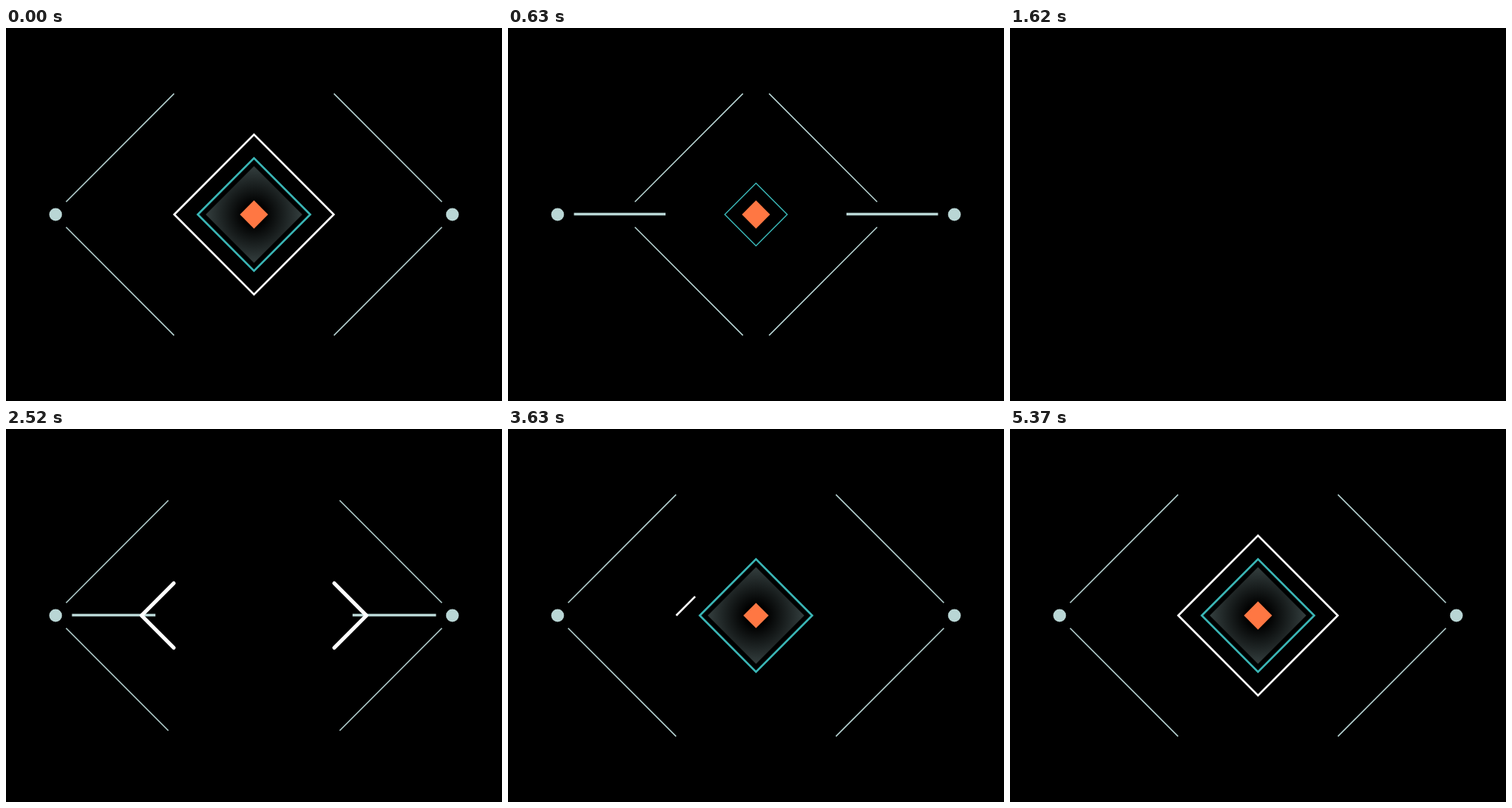
Write an HTML page with a canvas that moves like this. It is 658x494 px and loops after 5400 ms.

```html
<!DOCTYPE html>
<html lang="en">
<head>
<meta charset="utf-8">
<title>Diamond loop</title>
<style>
  html, body { margin: 0; width: 100%; height: 100%; overflow: hidden; background: #000; }
  canvas { display: block; }
</style>
</head>
<body>
<canvas id="stage" width="658" height="494"></canvas>
<script>
const ctx = document.getElementById('stage').getContext('2d');
const LOOP = 5400, CUT = 1620;
const PALE = '#b9d6d5', TEAL = '#3ab6b6', ORANGE = '#ff7743', WHITE = '#fff';
const OUTER = 105.8, INNER = 74.6, FILL = 64, CORE = 18.7;

const ease = {
  in: p => p * p,
  out: p => 1 - (1 - p) ** 2,
  cubicOut: p => 1 - (1 - p) ** 3,
  cubic: p => p < .5 ? 4 * p ** 3 : 1 - 4 * (1 - p) ** 3,
  sine: p => (1 - Math.cos(Math.PI * p)) / 2
};
// Eased progress of t between two times, clamped to 0..1.
const span = (t, from, to, curve = ease.sine) =>
  curve(Math.min(1, Math.max(0, (t - from) / (to - from))));
const mix = (a, b, p) => a + (b - a) * p;

const glow = ctx.createRadialGradient(0, 0, 14, 0, 0, FILL);
glow.addColorStop(0, '#000');
glow.addColorStop(1, '#343f3f');

function polyline(points, color, width, cap = 'butt') {
  ctx.beginPath();
  points.forEach(([x, y]) => ctx.lineTo(x, y));
  ctx.strokeStyle = color;
  ctx.lineWidth = width;
  ctx.lineCap = cap;
  ctx.lineJoin = cap === 'round' ? 'round' : 'miter';
  ctx.stroke();
}

function diamondPath(r) {
  ctx.beginPath();
  ctx.moveTo(-r, 0);
  ctx.lineTo(0, -r);
  ctx.lineTo(r, 0);
  ctx.lineTo(0, r);
  ctx.closePath();
}

function fillDiamond(r, paint, alpha = 1) {
  ctx.globalAlpha = alpha;
  diamondPath(r);
  ctx.fillStyle = paint;
  ctx.fill();
  ctx.globalAlpha = 1;
}

function strokeDiamond(r, color, width, alpha = 1, drawn = 1) {
  const length = 4 * Math.SQRT2 * r;
  if (drawn <= 0) return;
  ctx.globalAlpha = alpha;
  if (drawn < 1) ctx.setLineDash([drawn * length, length]);
  diamondPath(r);
  ctx.strokeStyle = color;
  ctx.lineWidth = width;
  ctx.lineCap = 'butt';
  ctx.lineJoin = 'miter';
  ctx.stroke();
  ctx.setLineDash([]);
  ctx.globalAlpha = 1;
}

function mirrored(draw) {
  for (const side of [1, -1]) {
    ctx.save();
    ctx.scale(side, 1);
    draw();
    ctx.restore();
  }
}

function dots(size) {
  mirrored(() => {
    ctx.beginPath();
    ctx.arc(-263.2, 0, 8.5 * size, 0, 2 * Math.PI);
    ctx.fillStyle = PALE;
    ctx.fill();
  });
}

function slopes(drawn, shift = 0) {
  if (drawn <= 0) return;
  mirrored(() => {
    for (const dir of [-1, 1]) {
      polyline([[shift - 249.3, dir * 16.8],
        [shift - 249.3 + 143.3 * drawn, dir * (16.8 + 143.3 * drawn)]], PALE, 1.5);
    }
  });
}

function bars(tail, head) {
  if (head <= tail) return;
  mirrored(() => polyline([[mix(-241.5, -120, tail), -.5], [mix(-241.5, -120, head), -.5]], PALE, 3.6));
}

function chevrons(drawn) {
  const r = 2 * INNER, arm = r * drawn;
  mirrored(() => polyline([[arm - r, -arm], [-r, 0], [arm - r, arm]], WHITE, 5, 'round'));
}

function collapse(t) {
  const spread = span(t, 0, 560), shift = 106 * span(t, 0, 690, ease.in);
  const kick = 1 + .055 * span(t, 690, 760, ease.out) - .037 * span(t, 760, 840);
  const shrink = mix(1, .555, span(t, 0, 630));
  strokeDiamond(OUTER * (1 + spread), WHITE, 2.6 * (1 + spread), 1 - spread);
  fillDiamond(FILL, glow, 1 - span(t, 0, 360));
  strokeDiamond(INNER * shrink, TEAL, 2.6 * shrink);
  fillDiamond(CORE, ORANGE);
  bars(0, span(t, 120, 570));
  dots(1);
  ctx.save();
  ctx.scale(kick, kick);
  slopes(1, shift);
  ctx.restore();
}

function rebuild(t) {
  dots(span(t, 1690, 1920, ease.out));
  slopes(span(t, 2240, 2690, ease.cubicOut));
  bars(span(t, 2560, 2800, ease.in), span(t, 2240, 2640, ease.out));

  const joined = span(t, 2370, 2790);
  if (joined > 0 && joined < 1) chevrons(joined);
  if (joined === 1) {
    const scale = mix(2, 1, span(t, 3030, 3430, ease.cubic));
    const tint = span(t, 2790, 3000);
    strokeDiamond(INNER * scale, WHITE, 2.6 * scale, 1 - tint);
    strokeDiamond(INNER * scale, TEAL, 2.6 * scale, tint);
  }
  fillDiamond(FILL, glow, span(t, 3330, 3600));
  fillDiamond(CORE * span(t, 3390, 3840, ease.cubicOut), ORANGE);

  // The frame loads in three strides.
  const loaded = .052 * span(t, 3180, 3420, ease.out)
    + .64 * span(t, 3570, 4470)
    + .308 * span(t, 4470, 5370, ease.in);
  strokeDiamond(OUTER, WHITE, 2.6, 1, loaded > .999 ? 1 : loaded);
}

function render() {
  const t = performance.now() % LOOP;
  ctx.setTransform(1, 0, 0, 1, 0, 0);
  ctx.fillStyle = '#000';
  ctx.fillRect(0, 0, 658, 494);
  ctx.translate(329, 247);
  (t < CUT ? collapse : rebuild)(t);
  requestAnimationFrame(render);
}
render();
</script>
</body>
</html>
```
